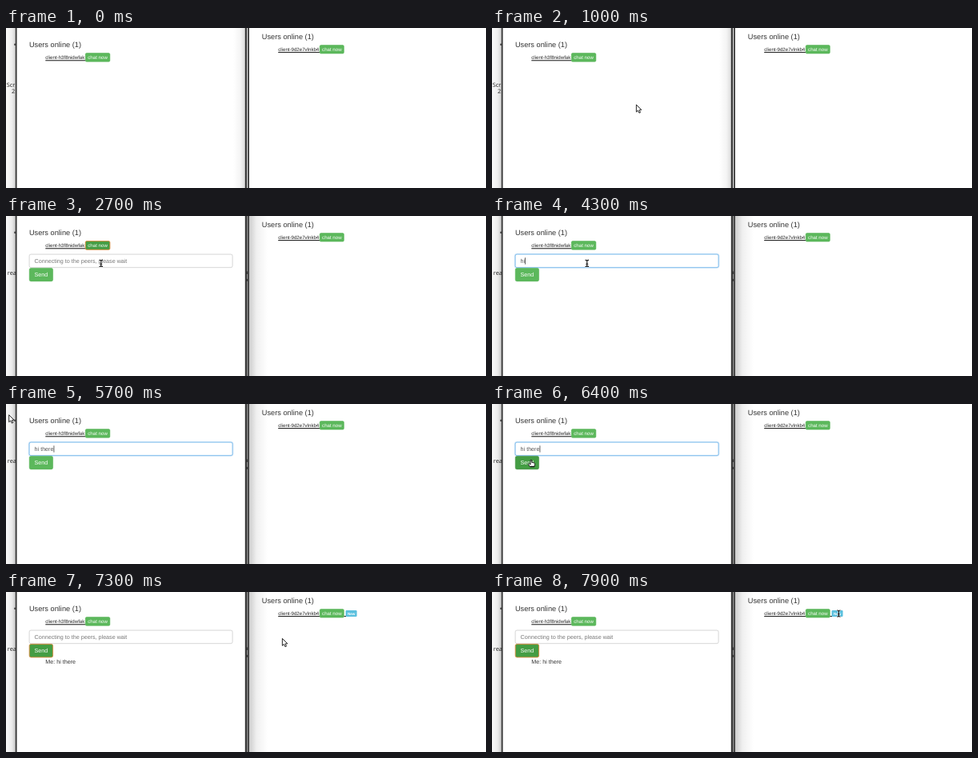
These frames come from a looping animation (600x201 px, 8 s). An HTML page:

```html
<!DOCTYPE html>
<html lang="en">
<head>
<meta charset="utf-8">
<title>Peer chat</title>
<style>
  html, body { margin: 0; width: 100%; height: 100%; overflow: hidden; background: #fff; }
  svg { display: block; width: 100vw; height: 100vh; }
  text { font-family: "Liberation Sans", Arial, sans-serif; font-size: 7.17px; fill: #333; text-rendering: geometricPrecision; white-space: pre; }
  .title { font-size: 9.22px; }
  .name { font-size: 6.14px; fill: #222; }
  .small { font-size: 6.14px; fill: #fff; }
  .send { fill: #fff; }
  .tag { font-size: 4.6px; font-weight: bold; fill: #fff; }
  .desk { font-family: "Open Sans", "Noto Sans", sans-serif; font-size: 7.3px; fill: #222; }
  .btn { fill: #5cb85c; stroke: #4cae4c; stroke-width: .5; }
  .btn.hot { fill: #449d44; stroke: #398439; }
  .btn.ring { stroke: #d98a3a; stroke-width: .9; }
  .field { fill: #fff; stroke: #c4c4c4; stroke-width: .7; }
  .field.on { stroke: #66afe9; stroke-width: .8; }
</style>
</head>
<body>
<svg viewBox="0 0 600 201" preserveAspectRatio="none">
  <defs>
    <linearGradient id="fade">
      <stop offset="0" stop-color="#000" stop-opacity="0"/>
      <stop offset=".6" stop-color="#000" stop-opacity=".06"/>
      <stop offset="1" stop-color="#000" stop-opacity=".2"/>
    </linearGradient>
    <g id="arrow">
      <path d="M.4 .4V9.4L2.5 7.5L4 10.8L5.5 10.1L4.1 6.9H6.9Z" fill="#fff" stroke="#111" stroke-width=".9" stroke-linejoin="round"/>
    </g>
    <g id="hand">
      <path d="M-.9 .7Q0 -.3 .8 .7V3.4L3.6 4Q4.7 4.3 4.6 5.3L4 8.9H-1.5L-3.7 5.6Q-3.5 4.5-2.4 5L-.9 6.1Z" fill="#fff" stroke="#111" stroke-width=".9" stroke-linejoin="round"/>
      <path d="M-1.3 8.4H3.9" stroke="#111" stroke-width="1"/>
    </g>
    <g id="beam" fill="none" stroke-linecap="round">
      <path id="stem" d="M-1.8 -4Q0 -4 0 -3V3Q0 4 -1.8 4M1.8 -4Q0 -4 0 -3V3Q0 4 1.8 4M-1 .8H1" stroke="#fff" stroke-width="1.8"/>
      <path d="M-1.8 -4Q0 -4 0 -3V3Q0 4 -1.8 4M1.8 -4Q0 -4 0 -3V3Q0 4 1.8 4M-1 .8H1" stroke="#111" stroke-width="1.1"/>
    </g>
  </defs>

  <rect width="600" height="201" fill="#fff"/>

  <!-- desktop strip -->
  <rect width="12" height="201" fill="#fafafa"/>
  <g id="desk1">
    <text class="desk" x=".8" y="73.5">Scr</text>
    <text class="desk" x="7" y="82">2</text>
  </g>
  <text class="desk" id="desk2" x="1.8" y="73.5">rea</text>
  <circle cx="11.2" cy="20.7" r="1.2" fill="#555"/>
  <rect id="edge" width="12" height="201" fill="url(#fade)"/>

  <!-- window frames -->
  <rect id="shadeL" x="284" width="15" height="201" fill="url(#fade)" opacity=".7"/>
  <rect id="shadeR" width="23" height="201" fill="url(#fade)" transform="translate(327 0) scale(-1 1)"/>
  <rect x="11.7" width="1.9" height="201" fill="#3a3a3a"/>
  <rect x="298.8" width="2.2" height="201" fill="#3a3a3a"/>
  <rect id="gap" x="301" width="1.2" height="201" fill="#d4d4d4"/>
  <rect x="302.2" width="1.8" height="201" fill="#3a3a3a"/>
  <path id="marks" d="M301.5 69.5V73M301.5 79V82" stroke="#333" stroke-width="1.2"/>

  <!-- left window -->
  <text class="title" x="28.9" y="23.8">Users online (1)</text>
  <text class="name" x="49.3" y="38.9">client-h3f8nidwfak</text>
  <rect x="49.3" y="40.3" width="50" height="1" fill="#111"/>
  <rect class="btn" id="chat" x="99.3" y="31.6" width="30.6" height="10.7" rx="1.5"/>
  <text class="small" x="102.3" y="39.2">chat now</text>
  <g id="form">
    <rect id="glow" x="27.9" y="46.9" width="256.4" height="18.9" rx="3" fill="#66afe9" opacity=".3"/>
    <rect class="field" id="field" x="29.1" y="48.1" width="254" height="16.6" rx="2"/>
    <text id="hint" x="35.6" y="59" style="fill:#777">Connecting to the peers, please wait</text>
    <text id="typed" x="35.6" y="59" style="fill:#555"></text>
    <rect id="caret" y="52.3" width=".7" height="8.4" fill="#222"/>
    <rect class="btn" id="send" x="29.2" y="65.6" width="29.4" height="16.4" rx="2"/>
    <text class="send" x="35.5" y="76.2">Send</text>
  </g>
  <text id="sent" x="49.3" y="90">Me: hi there</text>

  <!-- right window -->
  <text class="title" x="319.8" y="13.5">Users online (1)</text>
  <text class="name" x="340.2" y="28.8">client-9d2e7vlnkb4</text>
  <rect x="340.2" y="30.1" width="52" height="1" fill="#111"/>
  <rect class="btn" x="392.2" y="21.6" width="30.2" height="10.5" rx="1.5"/>
  <text class="small" x="395.1" y="29.1">chat now</text>
  <g id="badge">
    <rect x="422.6" y="30.1" width="2.4" height="1" fill="#111"/>
    <rect x="424.6" y="23" width="14" height="8" rx="1.2" fill="#5bc0de"/>
    <text class="tag" x="426.9" y="28.7">New</text>
  </g>

  <use id="cursor"/>
</svg>
<script>
const LOOP = 8000, STEP = 100;
const $ = id => document.getElementById(id);

// time, x, y, cursor shape used from that time on
const path = [
  [400, 580, 10, "arrow"], [600, 480, 92, "arrow"], [800, 320, 138, "arrow"],
  [1000, 180, 96, "arrow"], [1200, 121, 50, "arrow"], [1300, 120, 49, "arrow"],
  [1400, 120, 47.5, "arrow"], [1599, 120, 47.5, "arrow"], [1600, 116.5, 41, "hand"],
  [1700, 115.6, 39.3, "hand"], [2100, 115.6, 39.3, "hand"], [2200, 122, 50, "beam"],
  [2300, 131, 68, "arrow"], [2400, 137, 80, "arrow"], [2599, 137, 80, "arrow"],
  [2600, 124, 64, "beam"], [2700, 118.8, 59.4, "beam"], [5699, 118.8, 59.4, "beam"],
  [5700, 3.3, 13.3, "arrow"], [5799, 3.3, 13.3, "arrow"], [5800, 12.5, 14.5, "arrow"],
  [5900, 12.5, 14.5, "arrow"], [6200, 34, 44, "arrow"], [6300, 42, 58, "beam"],
  [6400, 49, 70, "hand"], [6500, 51.6, 73.6, "hand"], [6799, 51.6, 73.6, "hand"],
  [6800, 51, 90, "arrow"], [7000, 105, 88, "arrow"], [7200, 265, 70, "arrow"],
  [7400, 425, 46, "arrow"], [7500, 451, 36, "arrow"], [7600, 443, 29, "arrow"],
  [7700, 434.5, 27.4, "beam"], [7800, 433.4, 27, "beam"], [LOOP, 433.4, 27, "beam"]
];

// time, text in the field, caret position
const keys = [
  [3100, "", 35.5], [4300, "hi", 41.2], [4900, "hi t", 45.2],
  [5200, "hi the", 53.2], [5500, "hi there", 59.6]
];

function show(id, on) { $(id).style.display = on ? "" : "none"; }

function moveCursor(t) {
  const i = path.findIndex(p => p[0] > t) - 1;
  show("cursor", i >= 0);
  if (i < 0) return;
  const [t0, x0, y0, kind] = path[i], [t1, x1, y1] = path[i + 1];
  const k = (t - t0) / (t1 - t0);
  $("cursor").setAttribute("href", "#" + kind);
  $("cursor").setAttribute("transform", `translate(${x0 + (x1 - x0) * k} ${y0 + (y1 - y0) * k})`);
}

function draw(t) {
  const within = (a, b) => t >= a && t < b;
  const active = t >= 2000, focus = within(3100, 6600);

  show("desk1", t < 1600);
  show("desk2", t >= 1600);
  show("marks", t >= 1600);
  show("shadeL", !active);
  show("shadeR", active);
  $("edge").setAttribute("opacity", active ? 1.3 : .8);
  $("gap").setAttribute("fill", active ? "#858585" : "#d4d4d4");

  $("chat").classList.toggle("hot", within(1600, 3100));
  $("chat").classList.toggle("ring", within(2000, 3100));
  $("send").classList.toggle("hot", t >= 6400);
  $("send").classList.toggle("ring", t >= 6600);

  show("form", t >= 2100);
  show("glow", focus);
  $("field").classList.toggle("on", focus);
  const key = focus && keys.filter(k => k[0] <= t).pop();
  const value = key ? key[1] : "";
  $("typed").textContent = value;
  show("hint", !value);
  show("caret", focus && !within(3600, 4300));
  if (key) $("caret").setAttribute("x", key[2]);

  show("sent", t >= 6600);
  show("badge", t >= 6600);
  moveCursor(t);
}

const start = performance.now();
function tick() {
  const t = (performance.now() - start) % LOOP;
  draw(Math.floor(t / STEP) * STEP);
  requestAnimationFrame(tick);
}
tick();
</script>
</body>
</html>
```
